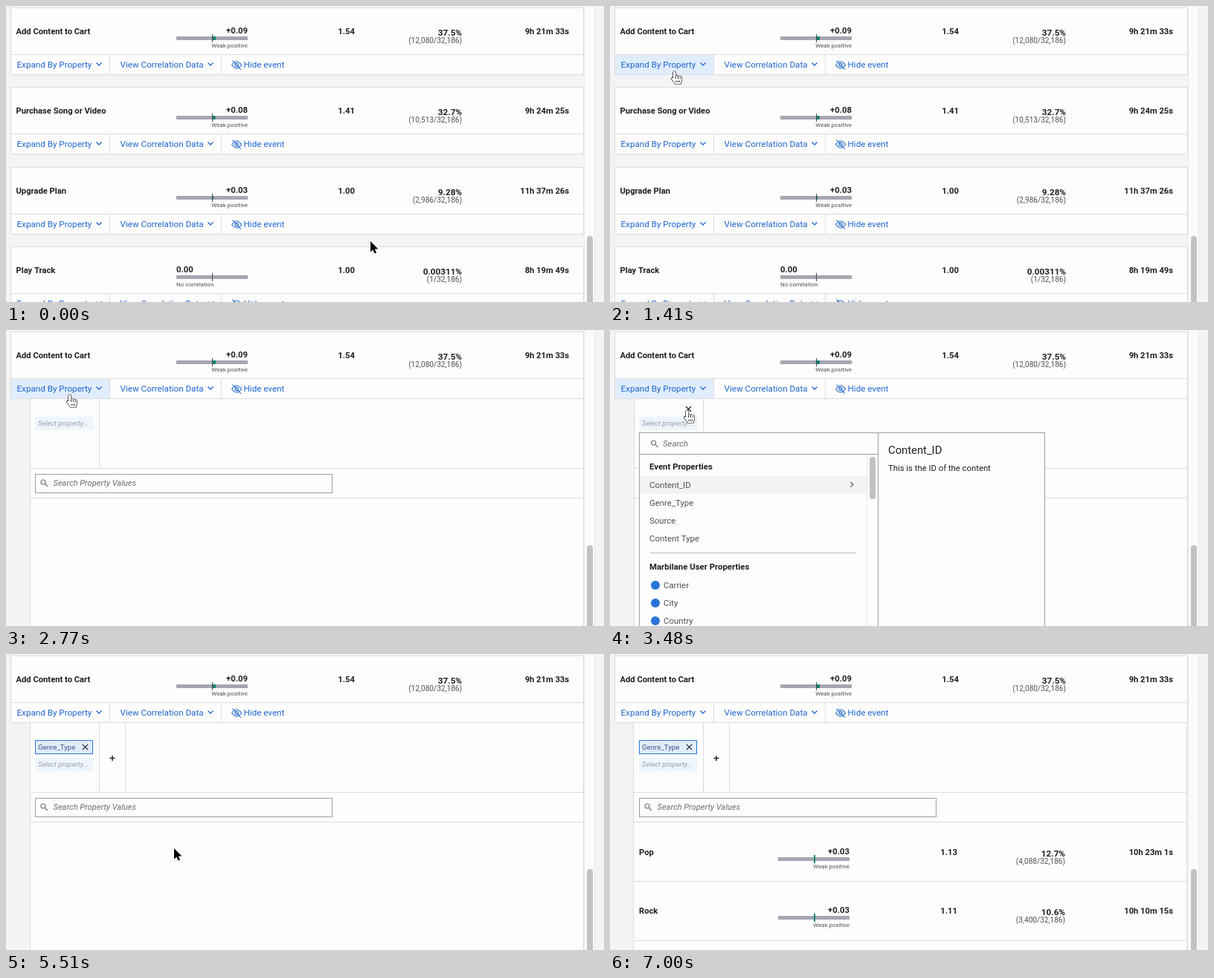
Recreate the animation shown at these times as an HTML page with a canvas. Size 804x399 px, loop 8 s.

```html
<!DOCTYPE html>
<html lang="en">
<head>
<meta charset="utf-8">
<title>Expand by property</title>
<style>
  html, body { margin: 0; width: 100%; height: 100%; overflow: hidden; background: #f3f4f5; }
  canvas { display: block; width: 804px; height: 399px; }
</style>
</head>
<body>
<canvas></canvas>
<script>
const LOOP = 8000, W = 804, H = 399;
const INK = '#1f1f25', GRAY = '#50505a', BLUE = '#1f66d0', LINE = '#dcdcdf', PAPER = '#fdfdfd', EDGE = '#9d9da9';
const canvas = document.querySelector('canvas');
const ctx = canvas.getContext('2d');
const ratio = window.devicePixelRatio || 1;
canvas.width = W * ratio;
canvas.height = H * ratio;

const EVENTS = [
  { top: 2, name: 'Add Content to Cart', score: '+0.09', bar: 5, avg: '1.54', pct: '37.5%', part: '12,080', time: '9h 21m 33s' },
  { top: 109, name: 'Purchase Song or Video', score: '+0.08', bar: 4.5, avg: '1.41', pct: '32.7%', part: '10,513', time: '9h 24m 25s' },
  { top: 217, name: 'Upgrade Plan', score: '+0.03', bar: 2, avg: '1.00', pct: '9.28%', part: '2,986', time: '11h 37m 26s' },
  { top: 324, name: 'Play Track', score: '0.00', bar: 0, avg: '1.00', pct: '0.00311%', part: '1', time: '8h 19m 49s' }
];
const GENRES = [
  { top: 235, name: 'Pop', score: '+0.03', bar: 1, avg: '1.13', pct: '12.7%', part: '4,088', time: '10h 23m 1s' },
  { top: 314, name: 'Rock', score: '+0.03', bar: 1, avg: '1.11', pct: '10.6%', part: '3,400', time: '10h 10m 15s' }
];
const PROPERTIES = ['Content_ID', 'Genre_Type', 'Source', 'Content Type'];

const ARROW = new Path2D('M0 0V14.5l3.3-3.1 2.3 5.2 2.4-1-2.2-5.1h4.6z');
const HAND = new Path2D('M-2 1.5a1.8 1.8 0 0 1 3.5 0v5c.5-1.2 2.8-1 3 .4c.6-1 2.6-.7 2.8.6c.8-.8 2.2-.3 2.2 1v3.5c0 2-1.3 2.8-1.5 5h-7.5c-.3-2-3-4-4.7-6.6c-.8-1.5 1-2.4 2.2-1.2z');

// Pointer: start time, x, y (off stage when x is negative)
const POINTER = [
  [0, 490, 317], [410, 468, 302], [470, 350, 232], [530, 180, 146], [580, 75, 95], [640, -50, 0],
  [930, 1, 23], [990, 26, 45], [1050, 51, 68], [1110, 70, 82], [1170, 82, 89], [1230, 87, 89],
  [1410, 87, 88], [1470, 86, 87],
  [3480, 104, 108], [3540, 106, 118], [3600, 116, 136], [3660, 133, 160], [3720, 153, 185], [3780, 173, 209],
  [3840, 191, 232], [3890, 204, 249], [3950, 211, 257], [4010, 213, 252], [4070, 212, 242], [4130, 211, 236],
  [5510, 226, 262], [5590, 256, 312], [5660, 288, 366], [5740, -50, 0]
];

function rect(x, y, w, h, color) {
  ctx.fillStyle = color;
  ctx.fillRect(x, y, w, h);
}

function frame(x, y, w, h, fill, border) {
  rect(x, y, w, h, border);
  rect(x + 1, y + 1, w - 2, h - 2, fill);
}

function pill(x, y, w, h, r, color) {
  ctx.fillStyle = color;
  ctx.beginPath();
  ctx.roundRect(x, y, w, h, r);
  ctx.fill();
}

function text(str, x, y, size, { color = INK, weight = 400, align = 'left', italic = false } = {}) {
  ctx.font = `${italic ? 'italic ' : ''}${weight} ${size}px Roboto, "Noto Sans", sans-serif`;
  ctx.textAlign = align;
  ctx.fillStyle = color;
  ctx.fillText(str, x, y);
}

function stroke(path, color, width = 1.2) {
  ctx.strokeStyle = color;
  ctx.lineWidth = width;
  ctx.stroke(new Path2D(path));
}

const chevron = (x, y, color) => stroke(`M${x - 3.5} ${y - 2}l3.5 3.5l3.5-3.5`, color, 1.3);
const cross = (x, y, r) => stroke(`M${x - r} ${y - r}l${2 * r} ${2 * r}m0 ${-2 * r}l${-2 * r} ${2 * r}`, INK);
const lens = (x, y) => stroke(`M${x + 2} ${y - 1}a3 3 0 1 0 -6 0a3 3 0 1 0 6 0m-1 2l4 4`, '#77777f', 1.2);

function metrics(row, nameX, shift = 0) {
  const y = row.top, bold = { weight: 600 }, right = { weight: 600, align: 'right' };
  const left = 229 - shift, mid = left + 48, end = left + 96;
  text(row.name, nameX, y + 36, 11.2, bold);
  rect(left, y + 39, 96, 5, '#a6a6b2');
  if (row.bar) rect(mid, y + 39, row.bar, 5, '#0d8570');
  rect(mid, y + 36, shift ? 2 : 1, 11, shift ? '#0d8570' : '#44444c');
  const small = { color: GRAY };
  if (row.bar) {
    text(row.score, end, y + 35, 11.3, right);
    text('Weak positive', end, y + 54, 7.9, { ...small, align: 'right' });
  } else {
    text(row.score, left, y + 35, 11.3, bold);
    text('No correlation', left, y + 54, 8, small);
  }
  text(row.avg, 469 - shift * 2 / 3, y + 36, 11.3, right);
  text(row.pct, 613 - shift / 3, y + 38, 11.7, right);
  text(`(${row.part}/32,186)`, 613 - shift / 3, y + 48, 10.1, { ...small, align: 'right' });
  text(row.time, 757, y + 36, 11.2, right);
}

function card(row, button) {
  const y = row.top, base = y + 81, link = { color: BLUE };
  frame(6, y, 771, 91, PAPER, LINE);
  metrics(row, 13.5);
  rect(6, y + 63, 771, 1, LINE);
  rect(139, y + 63, 1, 28, LINE);
  rect(289, y + 63, 1, 28, LINE);
  if (button) rect(7, y + 64, 132, 26, button);
  const label = button === '#21427a' || button === '#6f8cb8' ? '#fff' : BLUE;
  text('Expand By Property', 14.5, base, 11.65, { color: label });
  chevron(125, y + 76.5, label);
  text('View Correlation Data', 153.5, base, 11.65, link);
  chevron(275, y + 76.5, BLUE);
  const e = y + 77.5;
  stroke(`M303.5 ${e}q6.6-9 13.2 0q-6.6 9-13.2 0M312.3 ${e}a2.2 2.2 0 1 0-4.4 0a2.2 2.2 0 1 0 4.4 0M304.5 ${e - 6}l11.5 12.5`, BLUE, 1.1);
  text('Hide event', 319.5, base, 11.65, link);
}

function placeholder(y) {
  pill(39, y, 79, 18, 2, '#eff5fd');
  text('Select property...', 43, y + 12, 9.4, { color: '#969ca9', italic: true });
}

function panel(t, pointer) {
  const chosen = t >= 5510, loaded = t >= 7000, left = loaded ? 31 : 32;
  rect(left, 93, 745, H, LINE);
  rect(left + 1, 93, 743, H, PAPER);
  rect(left, 186, 745, 1, LINE);
  rect(left, 226, 745, 1, LINE);
  rect(125, 93, 1, 93, LINE);
  if (chosen) {
    rect(160, 93, 1, 93, LINE);
    frame(39, 116, 78, 19, '#e1ecfb', '#2c73d6');
    text('Genre_Type', 43, 129, 9.7, { color: '#3b5685' });
    cross(106.5, 125.5, 3.7);
    placeholder(140);
    stroke('M139.5 140.5h7m-3.5-3.5v7', INK, 1.5);
  } else {
    placeholder(117);
    if (t >= 3480 && pointer.y < 138) cross(105.5, 106.5, 3.5);
  }
  frame(39, 194, 400, 26, PAPER, EDGE);
  lens(51, 206);
  text('Search Property Values', 63.5, 210, 11.1, { color: '#6c6c75', italic: true });
  if (loaded) {
    GENRES.forEach(row => metrics(row, 39, 3));
    rect(left, 306, 745, 1, LINE);
    rect(left, 386, 745, 1, LINE);
  }
}

function popup(pointer) {
  const hover = Math.max(0, Math.min(3, Math.floor((pointer.y - 197) / 24)));
  const bold = { weight: 600 }, gray = { color: GRAY };
  frame(39, 138, 546, 300, PAPER, EDGE);
  rect(360, 138, 1, 300, EDGE);
  rect(40, 167, 320, 1, EDGE);
  rect(345, 168, 1, 240, '#e8e8ea');
  pill(349, 171, 8, 57, 4, '#c1c1c2');
  lens(59.5, 153);
  text('Search', 71, 157, 11.4, { color: '#6c6c75', italic: true });
  text('Event Properties', 53, 188, 11.4, bold);
  rect(40, 197 + hover * 24, 305, 24, '#f3f3f4');
  PROPERTIES.forEach((name, i) => text(name, 53, 213 + i * 24, 11.4, gray));
  stroke(`M323.5 ${205 + hover * 24}l3.3 3.3l-3.3 3.3`, GRAY, 1.2);
  rect(54, 300, 277, 1, '#bcbcc2');
  text('Marbilane User Properties', 53, 323, 11.4, bold);
  ['Carrier', 'City', 'Country'].forEach((name, i) => {
    pill(55, 338 + i * 24, 12, 12, 6, '#2a74d8');
    text(name, 72, 348 + i * 24, 11.4, gray);
  });
  text(PROPERTIES[hover], 374, 167, 14.8);
  text(hover ? 'No description' : 'This is the ID of the content', 374, 190, 11.3);
}

function drawPointer({ x, y, hand }) {
  if (x < 0) return;
  ctx.save();
  ctx.translate(x, y);
  ctx.lineJoin = 'round';
  const shape = hand ? HAND : ARROW;
  ctx.lineWidth = hand ? 1.2 : 2;
  ctx.strokeStyle = hand ? '#000' : '#fff';
  ctx.stroke(shape);
  ctx.fillStyle = hand ? '#fff' : '#000';
  ctx.fill(shape);
  if (hand) stroke('M1.5 6.5v3.5M4.5 7v3M7.3 7.8v2.4M2 12.5v2.5M4.3 12.5v2.5M6.5 12.5v2.5', '#000', 0.8);
  ctx.restore();
}

function buttonColor(t) {
  if (t < 1110 || t >= 3600) return null;
  if (t >= 2180 && t < 2240) return '#6f8cb8';
  if (t >= 2240 && t < 2770) return '#21427a';
  return t < 3540 ? '#e0edfd' : '#eff5fe';
}

function draw(t) {
  const [, x, y] = POINTER.findLast(step => step[0] <= t);
  const pointer = { x, y, hand: t >= 1170 && t < 5510 };
  const open = t >= 2770;
  ctx.setTransform(ratio, 0, 0, ratio, 0, 0);
  rect(0, 0, W, H, '#f3f4f5');
  rect(777, 0, 15, H, '#e9e9eb');
  rect(778, 0, 13, H, '#fbfbfb');
  pill(781, open ? 290 : 310, 8, 150, 4, '#c2c2c3');
  if (open) panel(t, pointer);
  EVENTS.slice(0, open ? 1 : 4).forEach((row, i) => card(row, i ? null : buttonColor(t)));
  if (t >= 2830 && t < 5510) popup(pointer);
  drawPointer(pointer);
}

const start = performance.now();
function tick() {
  draw((performance.now() - start) % LOOP);
  requestAnimationFrame(tick);
}
tick();
</script>
</body>
</html>
```
